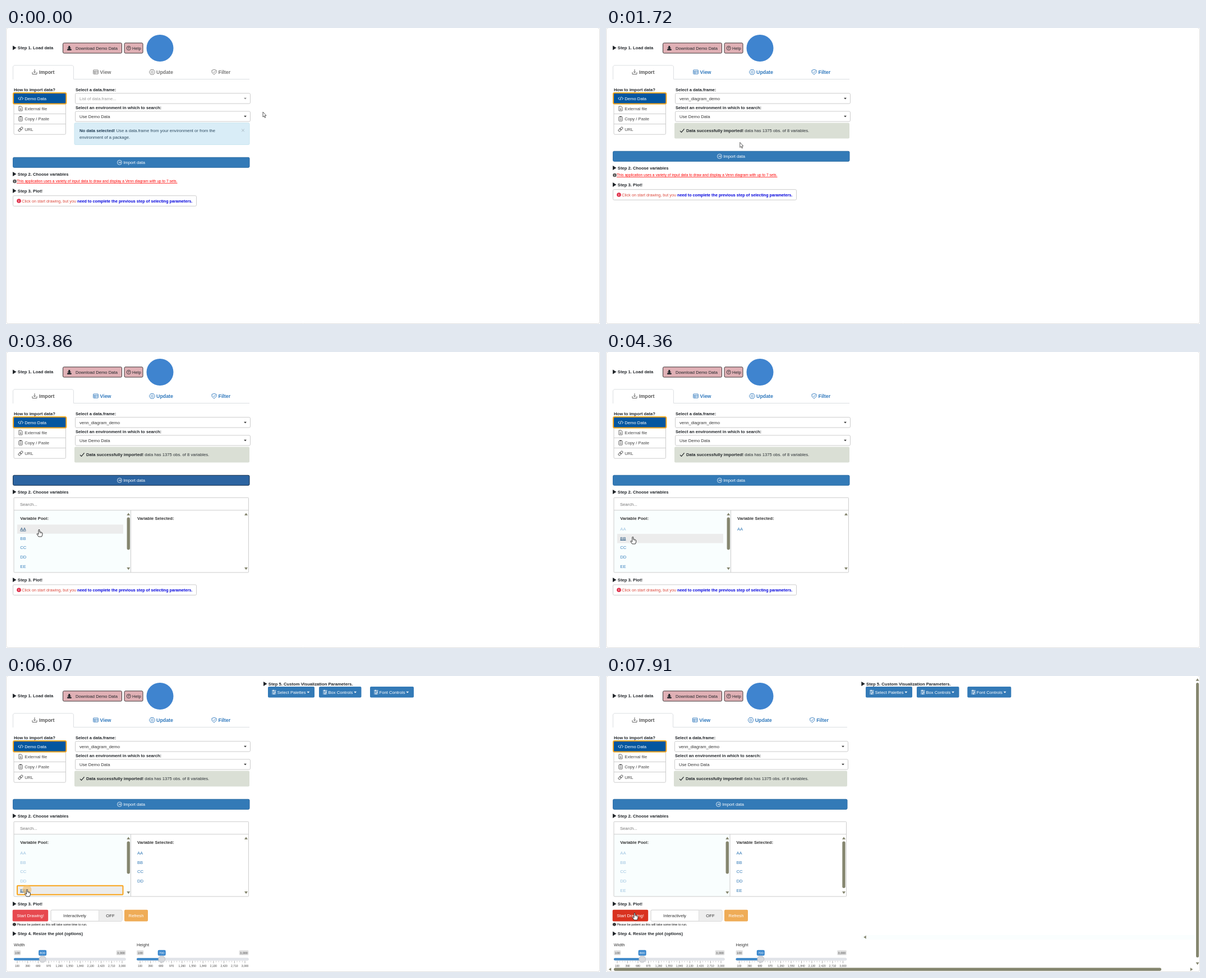
Recreate the animation shown at these times as an HTML page with a canvas. Size 1059 px wide and 529 px high, loop 8 s.

```html
<!DOCTYPE html>
<html lang="en">
<head>
<meta charset="utf-8">
<title>Data import walkthrough</title>
<style>
html, body { margin: 0; width: 100%; height: 100%; overflow: hidden; background: #fff; }
canvas { display: block; width: 1059px; height: 529px; }
</style>
</head>
<body>
<canvas id="stage"></canvas>
<script>
const W = 1059, H = 529, LOOP = 8000;
const canvas = document.getElementById('stage');
const dpr = window.devicePixelRatio || 1;
canvas.width = W * dpr;
canvas.height = H * dpr;
const c = canvas.getContext('2d');
const BLUE = '#337ab7', INK = '#212529', EDGE = '#ccc', OLIVE = '#85866f', ORANGE = '#f9a41b';
const NAMES = ['AA', 'BB', 'CC', 'DD', 'EE'];
const PICKED = [4160, 4660, 5180, 5680, 6170];

// Screen updates: start, end, number of steps
const RUNS = [[0, 0, 1], [100, 820, 8], [940, 1120, 3], [1320, 2040, 8], [2140, 2140, 1],
  [2340, 2640, 4], [2940, 3660, 8], [3760, 3860, 2], [4060, 4780, 8], [4880, 5680, 9],
  [5780, 6490, 8], [6590, 7190, 7], [7490, 7490, 1], [7690, 7690, 1], [7910, 7910, 1]];

// Pointer path: time, x, y
const PATH = [[0, 458, 150], [620, 272, 131], [820, 270.5, 131.5], [940, 272, 134], [1120, 284, 146],
  [1320, 283, 147], [1940, 223, 225], [2140, 222, 227], [2340, 222, 227], [2540, 231, 210],
  [2840, 231, 210], [3360, 82, 327], [3660, 64, 320], [3860, 59, 317], [4060, 59, 317],
  [4460, 46, 332], [4660, 45, 333], [4880, 40, 349], [5080, 40, 349], [5480, 38, 365],
  [5680, 38, 365], [5980, 37.5, 381], [6380, 37.5, 381], [7090, 52, 424], [7190, 51.5, 424], [7490, 51, 423]];

// Steps are rounded to whole 10 ms, so allow a little slack
function snap(t) {
  let run = RUNS[0];
  for (const r of RUNS) if (r[0] <= t) run = r;
  const [a, b, n] = run;
  if (t >= b) return b;
  const step = (b - a) / (n - 1);
  return a + Math.floor((t - a) / step + 0.15) * step;
}

function pointerAt(t) {
  for (let i = 1; i < PATH.length; i++) {
    const [t0, x0, y0] = PATH[i - 1], [t1, x1, y1] = PATH[i];
    if (t < t1) {
      const p = (t - t0) / (t1 - t0), e = p * p * (3 - 2 * p);
      return [x0 + (x1 - x0) * e, y0 + (y1 - y0) * e];
    }
  }
  return PATH[PATH.length - 1].slice(1);
}

function box(x, y, w, h, fill, stroke, r = 0, lw = 1) {
  c.beginPath();
  c.roundRect(x, y, w, h, r);
  if (fill) { c.fillStyle = fill; c.fill(); }
  if (stroke) { c.strokeStyle = stroke; c.lineWidth = lw; c.stroke(); }
}

function text(s, x, y, color = INK, size = 7.67, weight = 400, align = 'left') {
  c.font = `${weight} ${size}px "Liberation Sans", Arial, sans-serif`;
  c.textAlign = align;
  c.textBaseline = 'alphabetic';
  c.fillStyle = color;
  c.fillText(s, x, y + size * 0.375);
  return x + c.measureText(s).width;
}

const bold = (s, x, y, color, size) => text(s, x, y, color, size, 700);
const mid = (s, x, y, color, size) => text(s, x, y, color, size, 400, 'center');

function poly(pts, fill, stroke, lw = 1, close = !!fill) {
  c.beginPath();
  for (let i = 0; i < pts.length; i += 2) c.lineTo(pts[i], pts[i + 1]);
  if (close) c.closePath();
  if (fill) { c.fillStyle = fill; c.fill(); }
  if (stroke) { c.strokeStyle = stroke; c.lineWidth = lw; c.stroke(); }
}

function disc(x, y, r, fill, stroke, lw = 0.8) {
  c.beginPath();
  c.arc(x, y, r, 0, Math.PI * 2);
  if (fill) { c.fillStyle = fill; c.fill(); }
  if (stroke) { c.strokeStyle = stroke; c.lineWidth = lw; c.stroke(); }
}

// Small triangle, turned by quarter turns: 0 up, 1 right, 2 down, 3 left
function tri(x, y, turn, size = 3, color = OLIVE) {
  c.save();
  c.translate(x, y);
  c.rotate(turn * Math.PI / 2);
  poly([-size, size * 0.75, size, size * 0.75, 0, -size * 0.75], color);
  c.restore();
}

const caret = (x, y, color = '#333') => poly([x - 2.4, y - 1.2, x + 2.4, y - 1.2, x, y + 1.4], color);

function info(x, y, r, color) {
  disc(x, y, r, color);
  bold('i', x - r * 0.25, y, '#fff', r * 1.6);
}

function step(s, y, x = 12) {
  poly([x, y - 4, x + 6.5, y, x, y + 4], INK);
  bold(s, x + 8.8, y);
}

function header() {
  step('Step 1. Load data', 35.5);
  box(101.5, 26.8, 105, 18.2, '#e0b0b5', '#40383a', 2);
  poly([111.4, 32, 114.2, 32, 114.2, 35, 116.4, 35, 112.8, 38, 109.2, 35, 111.4, 35], INK);
  box(109, 37.5, 7.8, 2.4, INK, null, 1);
  text('Download Demo Data', 124, 36);
  box(211, 26.8, 33, 18.2, '#e0b0b5', '#40383a', 2);
  disc(218.8, 36, 3.6, null, INK);
  bold('?', 217.1, 36.2, INK, 5.6);
  text('Help', 225, 36);
  disc(274.5, 36, 24, '#3f84cf');
}

const tabIcons = [
  (x, k) => { poly([x - 4, 79, x - 4, 82.5, x + 4, 82.5, x + 4, 79], null, k, 0.9);
    poly([x, 74, x, 80], null, k, 0.9); poly([x - 2, 78, x, 80, x + 2, 78], null, k, 0.9); },
  (x, k) => { box(x - 4.3, 75, 8.6, 7.2, null, k, 0.5, 0.9);
    poly([x - 4, 77.4, x + 4, 77.4], null, k, 0.9); poly([x - 4, 79.8, x + 4, 79.8], null, k, 0.8);
    poly([x - 1.5, 77, x - 1.5, 82], null, k, 0.8); },
  (x, k) => { poly([x - 2.5, 74.5, x + 2.5, 74.5, x + 5, 78.8, x + 2.5, 83, x - 2.5, 83, x - 5, 78.8], null, k, 0.9, true);
    disc(x, 78.8, 1.8, null, k); },
  (x, k) => { poly([x, 74.3, x + 4, 75.6, x + 4, 79.5, x, 83.2, x - 4, 79.5, x - 4, 75.6], null, k, 0.9, true);
    poly([x - 1.8, 78.5, x - 0.4, 80, x + 2.2, 77], null, k, 0.9); }
];

function tabs(ready, k) {
  const right = 434 - 4 * k, edge = 120.5 - k;
  poly([12.5, 92, 12.5, 69, 14.5, 66.8, edge - 2, 66.8, edge, 69, edge, 91.5, right, 91.5], null, '#dcdfe2');
  const at = [51, 160 - 1.3 * k, 260.5 - 2.3 * k, 371 - 3.3 * k];
  const off = [8, 7.5, 7.5, 7.5];
  ['Import', 'View', 'Update', 'Filter'].forEach((s, i) => {
    const color = i ? (ready ? '#3079bd' : '#777') : '#555';
    tabIcons[i](at[i], color);
    bold(s, at[i] + off[i], 78.8, color, 8.85);
  });
}

function sources() {
  bold('How to import data?', 14, 110.5);
  box(14, 117, 92.5, 73.2, '#fff', EDGE, 2);
  for (let i = 1; i < 4; i++) poly([14, 117 + 18.2 * i, 106.5, 117 + 18.2 * i], null, EDGE);
  box(13, 116, 94.3, 19.4, '#04569f', ORANGE, 2, 2);
  text('Demo Data', 33.3, 126, '#fff');
  poly([24, 123.5, 21.8, 126, 24, 128.5], null, '#fff', 0.9);
  poly([28.4, 123.5, 30.6, 126, 28.4, 128.5], null, '#fff', 0.9);
  poly([27.2, 122.8, 25.2, 129], null, '#fff', 0.9);
  const g = '#444';
  poly([23, 140, 27, 140, 29, 142, 29, 148, 23, 148], null, g, 0.8, true);
  poly([26, 142.5, 26, 146.2], null, g, 0.8);
  poly([24.6, 145, 26, 146.4, 27.4, 145], null, g, 0.8);
  text('External file', 33.3, 144.3, g);
  box(22.8, 158.7, 6.4, 7.6, null, g, 0.8, 0.8);
  box(24.4, 157.6, 3.2, 1.8, g);
  poly([24.2, 162, 27.8, 162], null, g, 0.7);
  poly([24.2, 164, 27.8, 164], null, g, 0.7);
  text('Copy / Paste', 33.3, 162.5, g);
  c.save();
  c.translate(26, 181);
  c.rotate(-0.75);
  box(-4.8, -1.9, 5.6, 3.6, null, g, 1.8, 0.9);
  box(-0.8, -1.9, 5.6, 3.6, null, g, 1.8, 0.9);
  c.restore();
  text('URL', 33.3, 181, g);
}

function fields(s, k) {
  const x = 123.5 - k, w = 312 - 3 * k, tip = 426.5 - 4 * k;
  bold('Select a data.frame:', x + 0.5, 110.5);
  if (s.focus) box(x + 1, 117.3, w - 1.5, 17, '#d9d9d9', '#222', 2, 1.5);
  else box(x, 116.7, w, 18.4, '#fff', EDGE, 2);
  if (s.chosen) text('venn_diagram_demo', x + 7.5, 126, '#333');
  else text('List of data.frame...', x + 7.5, 126, s.focus ? '#444' : '#999');
  caret(tip, 126, s.chosen || s.focus ? '#333' : '#888');
  bold('Select an environment in which to search:', x + 0.5, 142.5);
  box(x, 148.9, w, 18.2, '#fff', EDGE, 2);
  text('Use Demo Data', x + 7.5, 158, '#333');
  caret(tip, 158);

  if (s.ready) {
    box(x - 1.5, 169.5, w, 28, '#dadfd5', null, 2);
    poly([x + 8.5, 183.8, x + 11, 186.3, x + 16, 180.3], null, INK, 1.2);
    const end = bold('Data successfully imported! ', x + 19.5, 183.5);
    text('data has 1375 obs. of 8 variables.', end, 183.5, '#2b3035');
  } else {
    box(x - 1.5, 169.7, w, 38.8, '#d9edf7', '#c9e6f0', 2);
    const end = bold('No data selected! ', x + 7.5, 183.5, '#1d3a52');
    text('Use a data.frame from your environment or from the', end, 183.5, '#2c4a60');
    text('environment of a package.', x + 7.5, 194.7, '#2c4a60');
    poly([420.2, 180.6, 424.8, 185.2], null, '#a9b8c0');
    poly([424.8, 180.6, 420.2, 185.2], null, '#a9b8c0');
  }

  if (s.open) {
    c.save();
    c.shadowColor = 'rgba(0,0,0,.35)';
    c.shadowBlur = 4 * dpr;
    c.shadowOffsetY = dpr;
    box(124, 137, 311, 27, '#fff');
    c.restore();
    text('venn_diagram_demo', 135, 147.3, '#333', 8.8);
    text('1375 obs. of 8 variables', 222, 147.8, '#888', 7.55);
  }
}

function importButton(s, k) {
  const y = s.ready ? 220.3 : 231.3, x = 202.5 - 2 * k;
  const fill = s.pressed ? '#2c64a1' : s.overImport ? '#286090' : BLUE;
  box(12.5, y, 421.5 - 4 * k, 18, fill, s.pressed ? '#16304c' : '#2e6da4', 2);
  disc(x, y + 9, 4, null, '#fff');
  poly([x - 2, y + 9, x + 2, y + 9], null, '#fff', 0.8);
  poly([x + 0.5, y + 7.4, x + 2.1, y + 9, x + 0.5, y + 10.6], null, '#fff', 0.8);
  text('Import data', x + 6.7, y + 9.2, '#fff');
}

function note(y) {
  info(15.5, y, 3.3, '#555');
  const end = text('This application uses a variety of input data to draw and display a Venn diagram with up to 7 sets.',
    19, y, '#f00', 6.65);
  box(19, y + 3, end - 19, 0.7, '#f00');
}

function warning(y) {
  box(12.5, y - 9.3, 327, 18.6, '#fff', EDGE, 2);
  info(23, y, 3.8, '#e0314b');
  const end = text('Click on start drawing, but you ', 28.3, y, '#dc4a3e', 7.22);
  bold('need to complete the previous step of selecting parameters.', end, y, '#0000dd', 7.2);
}

function pool(s, k) {
  const right = 432.5 - 4 * k, split = 222.5 - 1.5 * k, bar = 218.3 - 2 * k, bar2 = 428 - 4 * k, x2 = 234 - 1.5 * k;
  box(14, 283, split - 14, 111, '#f9fefe');
  box(14, 260.3, right - 14, 133.7, null, EDGE, 1);
  poly([14, 282.8, right, 282.8], null, EDGE);
  poly([split, 283, split, 394], null, EDGE);
  text('Search...', 25, 271.7, '#777');
  bold('Variable Pool:', 25.3, 297, '#333');
  bold('Variable Selected:', x2, 297, '#333');
  if (s.caretOn) poly([25.5, 292, 25.5, 301.5], null, '#222', 0.9);
  let n = 0;
  NAMES.forEach((name, i) => {
    const y = 316.4 + 16.6 * i, picked = s.t >= PICKED[i];
    const over = s.row === i && !picked;
    if (over) box(20, y - 8, 189, 16.4, '#ececec');
    if (over && s.t >= PICKED[i] - 110) box(20, y - 8, 188.5, 16, null, ORANGE, 1, 2);
    const end = text(name, 25.3, y, picked ? '#9dc3e0' : over ? '#23527c' : '#3a82bd');
    if (over) box(25.3, y + 3.2, end - 25.3, 0.8, '#23527c');
    if (picked) text(name, x2, 316.4 + 16.6 * n++, BLUE);
  });
  for (const x of [bar, bar2]) { tri(x, 289.7, 0); tri(x, 387.3, 2); }
  box(bar - 2.7, 295.5, 5.4, 58, OLIVE, null, 2.7);
  if (k) box(bar2 - 2.7, 295.5, 5.4, 83.5, OLIVE, null, 2.7);
}

function slider(label, x, w, value) {
  const a = x + 6, span = w - 12.5, hx = a + span * (value - 100) / 2900;
  text(label, x, 480, '#333');
  box(x, 490, 12.5, 9, '#e3e3e3', null, 2);
  mid('100', x + 6.2, 494.8, '#444', 5.5);
  box(x + w - 17, 490, 17, 9, '#e3e3e3', null, 2);
  mid('3,000', x + w - 8.5, 494.8, '#444', 5.5);
  box(hx - 7, 489.8, 14, 10, '#3a87cd', null, 2);
  mid(value, hx, 494.9, '#fff', 5.8);
  box(x, 504, w, 4.3, '#e1e4e9', '#d3d7dd', 2, 0.5);
  box(x, 504, hx - x, 4.3, '#428bca', null, 2);
  for (let i = 0; i <= 40; i++) {
    const big = i % 4 === 0, tx = a + span * i / 40;
    poly([tx, 509, tx, big ? 513.5 : 511.5], null, big ? '#777' : '#aaa', 0.6);
    if (big) mid((100 + 72.5 * i).toLocaleString('en-US'), tx, 518, '#444', 4.95);
  }
  disc(hx, 506, 6, '#d6d8dc', '#b9bdc3');
}

function plotPanel(s, k) {
  box(11.7, 417.8, 63.5, 20.7, s.overStart ? '#d9321f' : '#e7484f', null, 2);
  mid('Start Drawing!', 43.5, 428.3, '#fff');
  box(80, 418.2, 127, 20, '#fff', EDGE, 2);
  box(165.5, 418.7, 41, 19, '#eee');
  poly([165.5, 418.5, 165.5, 438], null, '#ddd');
  mid('Interactively', 122.5, 428.3, '#333');
  mid('OFF', 186, 428.3, '#333');
  box(211, 417.8, 42, 20.7, '#efac57', null, 2);
  mid('Refresh', 232, 428.3, '#fff');
  info(14.8, 444, 2.8, '#111');
  text('Please be patient as this will take some time to run.', 19.2, 444.2, '#111', 5.53);
  step('Step 4. Resize the plot (options)', 460.5);
  slider('Width', 14, 199.5 - 2 * k, 800);
  slider('Height', 233 - 1.5 * k, 199.5 - 2 * k, 700);
}

function styleMenu(s, x, w) {
  box(x, 19, w, 19.5, BLUE, null, 2);
  [[26, 2], [28.9, 5], [31.8, 3]].forEach(([y, dx]) => {
    poly([x + 7, y, x + 14.5, y], null, '#fff', 1);
    box(x + 7 + dx, y - 1.2, 1.4, 2.4, '#fff');
  });
  caret(text(s, x + 16.5, 29, '#fff') + 4.3, 29, '#fff');
}

function stylePanel(k) {
  step('Step 5. Custom Visualization Parameters.', 13.9, 459 - 3.7 * k);
  styleMenu('Select Palettes', 467 - 4 * k, 83);
  styleMenu('Box Controls', 558 - 4 * k, 75.5);
  styleMenu('Font Controls', 649 - 4.7 * k, 78);
}

function scrollbars() {
  box(455, 463, 595, 8, '#fafefe');
  tri(461.5, 466.8, 3);
  tri(1054.5, 6.5, 0);
  tri(1054.5, 514, 2);
  box(1052, 12, 5, 491, OLIVE, null, 2.5);
  tri(7, 524.2, 3);
  tri(1044, 524.2, 1);
  box(14, 521.5, 976, 5.4, OLIVE, null, 2.7);
}

function pointer(x, y, hand) {
  c.save();
  c.translate(x, y);
  c.lineJoin = 'round';
  if (hand) {
    poly([-1, 1, 0, 0, 1, 1, 1, 5, 3, 4.8, 5, 5.6, 6, 7, 5.8, 10, 4.6, 13, -1, 13, -4, 8.5, -3.4, 7.5, -1, 9],
      '#fff', '#222', 0.9);
    poly([2.3, 5.2, 2.3, 7.4], null, '#444', 0.6);
    poly([4, 5.6, 4, 7.6], null, '#444', 0.6);
  } else {
    poly([0, 0, 0, 9, 2, 7.2, 3.4, 10.4, 4.8, 9.8, 3.4, 6.7, 6, 6.5], '#fff', '#333', 0.8);
  }
  c.restore();
}

function draw(now) {
  const t = snap(now), [x, y] = pointerAt(t);
  const within = (a, b) => t >= a && t < b;
  const inside = (l, top, r, bottom) => x >= l && x <= r && y >= top && y <= bottom;
  const s = {
    t,
    focus: within(600, 1400),
    open: within(700, 1400),
    chosen: t >= 1400,
    ready: t >= 1500,
    pressed: within(2340, 4060),
    listed: t >= 2430,
    plot: t >= 4660,
    caretOn: within(4680, 5080) || within(6170, 6690) || within(7190, 7690)
  };
  s.overImport = s.ready && inside(12, 220, 434, 238);
  s.overStart = s.plot && inside(12, 418, 75, 438);
  s.row = s.listed && inside(20, 308, 209, 391) ? Math.floor((y - 308) / 16.6) : -1;
  const k = t >= 7910 ? 1 : 0;

  c.setTransform(dpr, 0, 0, dpr, 0, 0);
  c.fillStyle = '#fff';
  c.fillRect(0, 0, W, H);
  box(0.5, -0.5, 1058, 529, null, '#dfdfdf', 4);
  header();
  tabs(s.ready, k);
  sources();
  fields(s, k);
  importButton(s, k);
  step('Step 2. Choose variables', s.ready ? 250 : 261);
  if (s.listed) {
    pool(s, k);
    step('Step 3. Plot!', 407.2);
  } else {
    note(s.ready ? 263 : 274);
    step('Step 3. Plot!', s.ready ? 280 : 291);
  }
  if (s.plot) {
    plotPanel(s, k);
    stylePanel(k);
  } else {
    warning(s.listed ? 425.2 : s.ready ? 298 : 309);
  }
  if (k) scrollbars();

  if (PICKED.some(p => within(p - 110, p))) disc(x, y + 1, 8, 'rgba(245,190,100,.6)');
  const hand = s.overImport || s.overStart || s.row >= 0 || inside(123, 116, 436, 135)
    || (s.open && inside(124, 135, 435, 164));
  pointer(x, y, hand);
}

const start = performance.now();
function tick() {
  draw((performance.now() - start) % LOOP);
  requestAnimationFrame(tick);
}
tick();
</script>
</body>
</html>
```
